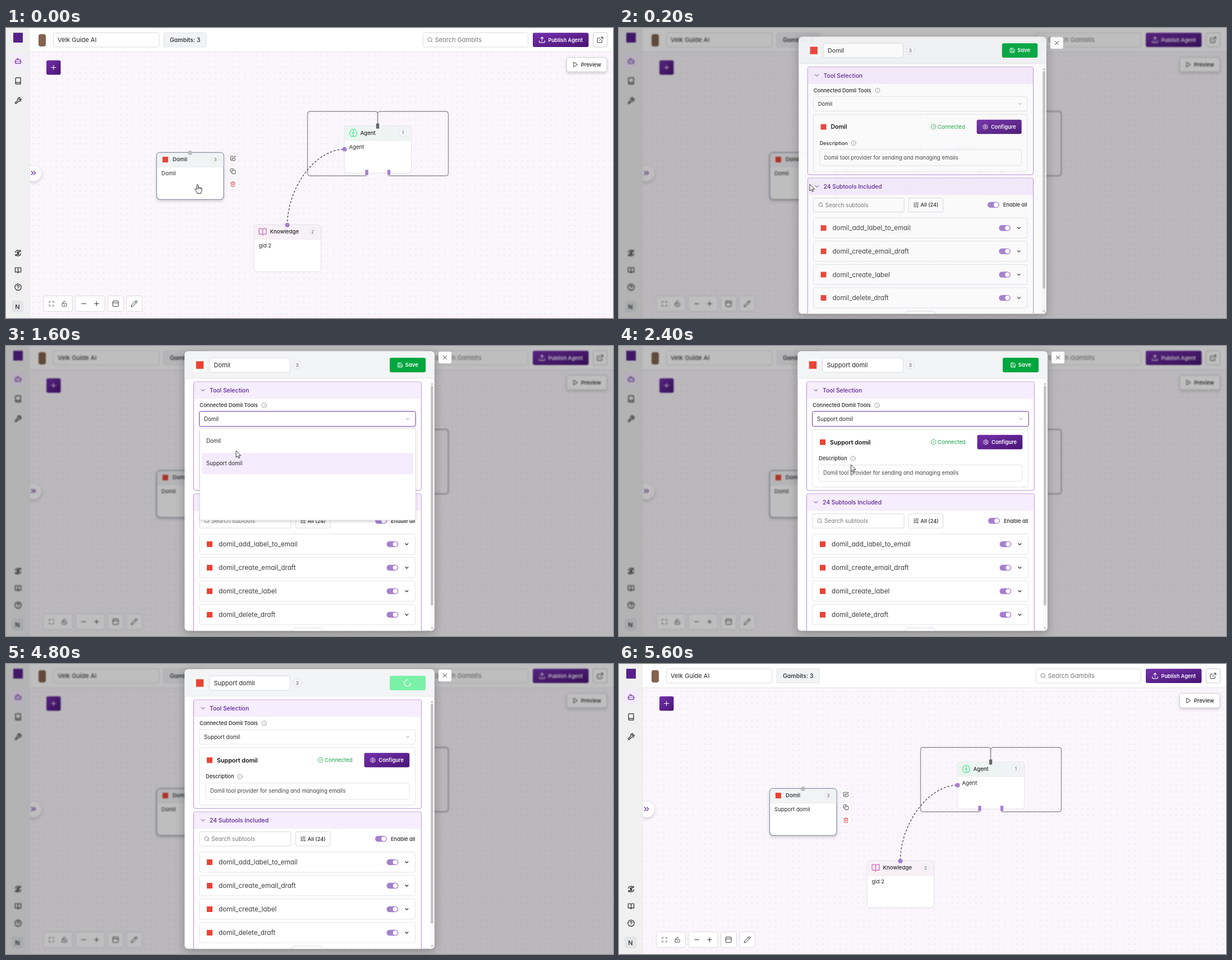
Animation of 1082 by 518 pixels, one loop 5670 ms. Source, as an HTML page:

```html
<!DOCTYPE html>
<html lang="en">
<head>
<meta charset="utf-8">
<title>Agent builder</title>
<style>
html, body { margin: 0; width: 100%; height: 100%; overflow: hidden; background: #fff; }
svg { display: block; width: 1082px; height: 518px; }
text { font-family: Inter, "Open Sans", sans-serif; font-feature-settings: "cv11"; white-space: pre; }
</style>
</head>
<body>
<svg id="stage" viewBox="0 0 1082 518"></svg>
<script>
const LOOP = 5670;
const TOOL = 'Domil', RENAMED = 'Support domil';
const INK = '#262626', PURPLE = '#5c2394', LILAC = '#a67fcf', LINE = '#e2e3e6', RED = '#ea4335';

// ---- drawing helpers (all return SVG markup) ----
const box = (x, y, x2, y2, fill, stroke = 'none', r = 3, extra = '') =>
  `<rect x="${x}" y="${y}" width="${x2 - x}" height="${y2 - y}" rx="${r}" fill="${fill}" stroke="${stroke}" ${extra}/>`;
const disc = (x, y, r, fill, stroke = 'none', extra = '') =>
  `<circle cx="${x}" cy="${y}" r="${r}" fill="${fill}" stroke="${stroke}" ${extra}/>`;
const label = (s, x, cy, size, fill = INK, weight = 400, extra = '') =>
  `<text x="${x}" y="${cy + size * 0.36}" font-size="${size}" fill="${fill}" font-weight="${weight}" ${extra}>${s}</text>`;
const line = (d, stroke, w = 1, extra = '') =>
  `<path d="${d}" fill="none" stroke="${stroke}" stroke-width="${w}" ${extra}/>`;
const mark = (cx, cy, s) => box(cx - s / 2, cy - s / 2, cx + s / 2, cy + s / 2, RED, 'none', 0);
const badge = (n, cx, cy, r = 6.5) =>
  disc(cx, cy, r, '#f6f6f8', '#e3e4e8') + label(n, cx, cy, 8.2, '#555', 400, 'text-anchor="middle"');

// icons on a 24 unit grid
const ICONS = {
  bot: 'M12 8V4H8M6 8H18Q20 8 20 10V18Q20 20 18 20H6Q4 20 4 18V10Q4 8 6 8ZM2 14H4M20 14H22M15 13V15M9 13V15',
  book: 'M4 19.5V4.5A2.5 2.5 0 0 1 6.5 2H20V22H6.5A2.5 2.5 0 0 1 6.5 17H20',
  wrench: 'M14.7 6.3a1 1 0 0 0 0 1.4l1.6 1.6a1 1 0 0 0 1.4 0l3.8-3.8a6 6 0 0 1-7.9 7.9l-7 7a2 2 0 0 1-3-3l7-7a6 6 0 0 1 7.9-7.9z',
  coin: 'M3 10A9.5 9.5 0 0 1 20 7M21 14A9.5 9.5 0 0 1 4 17M20 3V7H16M4 21V17H8M15 9Q12 7 9.5 9T12 12T14.5 15T9 15M12 6V18',
  open: 'M12 7V21M3 18V4H8Q12 4 12 7Q12 4 16 4H21V18H15Q12 18 12 21Q12 18 9 18Z',
  help: 'M22 12A10 10 0 1 1 2 12A10 10 0 1 1 22 12M9 9A3 3 0 0 1 15 10Q15 12 12 13.5M12 17V17.1',
  info: 'M22 12A10 10 0 1 1 2 12A10 10 0 1 1 22 12M12 16V12M12 8V8.1',
  done: 'M21.8 10A10 10 0 1 1 17 3.3M9 11L12 14L22 4',
  search: 'M19 11A8 8 0 1 1 3 11A8 8 0 1 1 19 11M21 21L16.7 16.7',
  upload: 'M12 15V3M7 8L12 3L17 8M3 15V19Q3 21 5 21H19Q21 21 21 19V15',
  link: 'M15 3H21V9M10 14L21 3M18 13V19Q18 21 16 21H5Q3 21 3 19V8Q3 6 5 6H11',
  play: 'M6 3L20 12L6 21Z',
  plus: 'M5 12H19M12 5V19',
  minus: 'M5 12H19',
  x: 'M18 6L6 18M6 6L18 18',
  down: 'M6 9L12 15L18 9',
  double: 'M6 17L11 12L6 7M13 17L18 12L13 7',
  pencil: 'M17 3A2.8 2.8 0 0 1 21 7L7.5 20.5L2 22L3.5 16.5ZM15 5L19 9',
  edit: 'M12 3H5Q3 3 3 5V19Q3 21 5 21H19Q21 21 21 19V12M18.4 2.6A2.1 2.1 0 0 1 21.4 5.6L12 15L8 16L9 12Z',
  copy: 'M10 8H20Q22 8 22 10V20Q22 22 20 22H10Q8 22 8 20V10Q8 8 10 8ZM4 16Q2 16 2 14V4Q2 2 4 2H14Q16 2 16 4',
  trash: 'M3 6H21M19 6V20Q19 22 17 22H7Q5 22 5 20V6M8 6V4Q8 2 10 2H14Q16 2 16 4V6M10 11V17M14 11V17',
  expand: 'M8 3H5Q3 3 3 5V8M21 8V5Q21 3 19 3H16M3 16V19Q3 21 5 21H8M16 21H19Q21 21 21 19V16',
  unlock: 'M5 11H19Q21 11 21 13V20Q21 22 19 22H5Q3 22 3 20V13Q3 11 5 11ZM7 11V7A5 5 0 0 1 16.9 6M12 15V18',
  panel: 'M5 3H19Q21 3 21 5V19Q21 21 19 21H5Q3 21 3 19V5Q3 3 5 3ZM3 9H21',
  brain: 'M12 5A3 3 0 0 0 6 5Q3 6.5 4 10.5Q0 14 4 17.5Q5 22 9 22Q12 21 12 18ZM12 5A3 3 0 0 1 18 5Q21 6.5 20 10.5Q24 14 20 17.5Q19 22 15 22Q12 21 12 18M9 13Q11.5 12 12 9M15 13Q12.5 12 12 9',
  disk: 'M15 3H5Q3 3 3 5V19Q3 21 5 21H19Q21 21 21 19V9ZM17 21V14H7V21M7 3V8H15',
  sliders: 'M3 5H10M14 5H21M14 3V7M3 12H8M12 12H21M8 10V14M3 19H12M16 19H21M16 17V21',
  gear: 'M10 3L14 3L14.6 5.4L17 6.8L19.4 6.1L21.4 9.6L19.6 11.3V13L21.4 14.6L19.4 18L17 17.3L14.6 18.7L14 21H10L9.4 18.7L7 17.3L4.6 18L2.6 14.6L4.4 13V11.3L2.6 9.6L4.6 6.1L7 6.8L9.4 5.4ZM15 12A3 3 0 1 1 9 12A3 3 0 1 1 15 12',
  spin: 'M21 12A9 9 0 1 1 14.8 3.4'
};
const icon = (name, cx, cy, size, color = INK, w = 2) =>
  `<path transform="translate(${cx - size / 2} ${cy - size / 2}) scale(${size / 24})" d="${ICONS[name]}" fill="none" stroke="${color}" stroke-width="${w}" stroke-linecap="round" stroke-linejoin="round"/>`;

const defs = `<defs>
  <linearGradient id="violet" x1="0" y1="0" x2="1" y2="1"><stop stop-color="#7430ac"/><stop offset="1" stop-color="#481573"/></linearGradient>
  <linearGradient id="mint"><stop stop-color="#eaf6f0"/><stop offset="1" stop-color="#f2f3f5"/></linearGradient>
  <pattern id="dots" x="47" y="48" width="10.5" height="10.5" patternUnits="userSpaceOnUse"><circle cx="1" cy="1" r=".7" fill="#d3cbdc"/></pattern>
  <filter id="soft" x="-30%" y="-30%" width="160%" height="170%"><feDropShadow dx="0" dy="2.5" stdDeviation="2.5" flood-opacity=".16"/></filter>
  <filter id="deep" x="-15%" y="-15%" width="130%" height="130%"><feDropShadow dx="0" dy="4" stdDeviation="9" flood-opacity=".28"/></filter>
  <clipPath id="panel"><rect x="318.5" y="9.5" width="445" height="499" rx="6"/></clipPath>
</defs>`;

// ---- workspace ----
function card(x, y, name, n, body, head, border, art, id = '', extra = '') {
  return box(x, y, x + 119.5, y + 84, '#fff', border, 6, extra) +
    `<path d="M${x + .6} ${y + 26}V${y + 6}q0-5.4 5.4-5.4h107.5q5.4 0 5.4 5.4v20z" fill="${head}"/>` +
    line(`M${x + .6} ${y + 26}h118`, '#e6e7ea', .8) + art +
    label(name, x + 28.5, y + 12.5, 9.6, INK, 500) + badge(n, x + 104.5, y + 12.5) +
    label(body, x + 8.5, y + 37.3, 9.6, INK, 400, id);
}

function workspace() {
  const gray = '#919194';
  let s = box(-20, -20, 1102, 538, '#faf6fc', 'none', 0) + box(42, 42, 1102, 538, 'url(#dots)', 'none', 0);
  s += line('M662.5 172V154q0-5-5-5H542.5q-5 0-5 5V259q0 5 5 5H642.5V258', gray, 1.4);
  s += line('M662.5 172V154q0-5 5-5H783.5q5 0 5 5V259q0 5-5 5H682.5V258', gray, 1.4);
  s += card(603, 175, 'Agent', 1, 'Agent', 'url(#mint)', '#dfe2e6', icon('brain', 619, 187.5, 16, '#5be39c', 1.8));
  s += card(442, 351.3, 'Knowledge', 2, 'gid 2', '#f8f1f7', '#dfe0e6', icon('open', 457.5, 364, 17, '#d678bd', 2.1));
  s += card(268.5, 222.3, TOOL, 3, TOOL, '#f2f3f5', '#8b93a3', mark(284, 235, 10), 'id="note"', 'stroke-width="1.3" filter="url(#soft)"');
  s += line('M501.5 352C501.5 284 552.5 216.5 603.5 216.5', '#48434f', 1.3, 'id="wire" stroke-dasharray="3.7 2.9"');
  s += box(659.5, 170, 665.5, 180, '#666', '#fff', 0, 'stroke-width=".6"');
  for (const x of [640, 679.5]) s += box(x, 253, x + 6, 263, LILAC, '#fff', 0, 'stroke-width=".6"');
  s += disc(603.5, 216.5, 4, LILAC) + disc(501.5, 352, 4, LILAC) + disc(328, 223, 4, '#bcbcbe');
  [['edit', INK], ['copy', INK], ['trash', '#e23b3b']].forEach(([name, c], i) => {
    const y = 233 + i * 23;
    s += disc(404.5, y, 10, '#fff', '#eceaf0') + icon(name, 404.5, y, 10.5, c);
  });

  // floating controls
  s += box(72, 57.8, 97.5, 83.5, 'url(#violet)') + icon('plus', 84.8, 70.5, 14, '#fff', 1.8);
  s += box(999.5, 52.5, 1071, 78, '#fff', '#cfcfd6', 3, 'filter="url(#soft)"') +
    icon('play', 1015, 65.3, 11) + label('Preview', 1025, 65.3, 9.4, INK, 500);
  for (const [a, b] of [[66.5, 118.5], [124, 176], [181.5, 209.5], [214.5, 242.5]])
    s += box(a, 478.5, b, 506.5, '#fff', '#dadadf');
  [['expand', 81], ['unlock', 104], ['minus', 138.5], ['plus', 161.5], ['panel', 195.3], ['pencil', 228.5]].forEach(([name, x], i) => {
    s += icon(name, x, 492.5, i < 2 ? 11 : 13, INK, 1.7);
  });
  s += disc(49, 259.5, 14.5, '#fff', '#e9e6ee', 'filter="url(#soft)"') + icon('double', 49, 259, 14.5, PURPLE);

  // top bar
  s += box(42, -20, 1102, 42, '#fff', 'none', 0) + line('M42 42.5H1102', '#e3e1e6');
  s += box(58, 11, 71, 33, '#84634f', 'none', 4);
  s += box(84.5, 8.5, 273, 34, '#fff', '#d9dade') + label('Velk Guide AI', 92, 21.3, 11);
  s += box(281, 8.5, 357, 34, '#f2f3f5', '#e2e3e7') + label('Gambits: 3', 292, 21.3, 10.5, INK, 500);
  s += box(743.5, 8.5, 930.5, 34, '#fff', '#d9dade') + icon('search', 756, 21, 11, '#777') + label('Search Gambits', 764.5, 21.3, 11, '#757575');
  s += box(939, 8.5, 1038.5, 34, 'url(#violet)') + icon('upload', 955.5, 21, 13, '#fff') + label('Publish Agent', 966.5, 21.2, 9.2, '#fff', 600);
  s += box(1046.5, 8.5, 1071.5, 34, '#fff', '#c9c9cf') + icon('link', 1059, 21.2, 13, INK, 1.8);

  // side bar
  s += box(-20, -20, 42.5, 538, '#f0f0f1', 'none', 0) + line('M42.5 43V538', '#e6e4e9', .7);
  s += box(13, 8.5, 30, 26, '#562089', 'none', 0) + box(10, 46, 33, 72, '#f4ebfc');
  [['bot', 59], ['book', 94.5], ['wrench', 130], ['coin', 402], ['open', 432.5], ['help', 463]].forEach(([name, y], i) => {
    s += icon(name, 21.5, y, 13.5, i ? INK : PURPLE, 2.1);
  });
  s += box(10, 487, 31, 508, '#e2e4e6', 'none', 4) + label('N', 20.5, 497.6, 11, INK, 500, 'text-anchor="middle"');
  return s;
}

// ---- dialog ----
const toggle = (x, y) => box(x, y - 5.2, x + 20.8, y + 5.2, LILAC, 'none', 5.2) + disc(x + 15.2, y, 4.1, '#fff');
const section = (y, y2, title) =>
  box(334.5, y, 740.3, y2, '#fff', '#b489d8') +
  box(335, y + .5, 739.8, y + 30.5, '#f6edfd', 'none', 2.5) +
  icon('down', 351, y + 15, 12, PURPLE) + label(title, 363, y + 15.2, 10.4, PURPLE, 500);

function dialog() {
  let s = box(318.5, 9.5, 763.5, 508.5, '#fff', 'none', 6, 'filter="url(#deep)"') +
    '<g clip-path="url(#panel)">' + box(318, 9, 764, 57.5, '#f3f4f6', 'none', 0) + line('M318 57.5H764', '#e6e7ea');
  s += box(334.5, 23, 357, 45.5, '#fafafb') + mark(345.5, 34, 13.5);
  s += box(362.5, 21.3, 506.3, 47, '#fff', '#d9dbe0') + label(TOOL, 370.5, 34.2, 11, INK, 400, 'class="name"');
  s += badge(3, 519, 33.8, 7.5);
  s += box(684, 21, 748, 47, '#00a63e', 'none', 3, 'id="save"');
  s += `<g id="saveText">${icon('disk', 702.5, 34, 10.5, '#fff')}${label('Save', 711.5, 34, 9.6, '#fff', 600)}</g>`;
  s += `<g id="spinner">${icon('spin', 715.5, 34, 15, '#fff', 2)}</g>`;

  s += section(64, 258, 'Tool Selection');
  s += label(`Connected ${TOOL} Tools`, 345, 105.8, 9.4, INK, 500) + icon('info', 460.2, 106, 10, '#777', 1.8);
  s += box(345, 117.2, 729.5, 143.3, '#fff', LINE, 3) + box(344.5, 116.7, 730.2, 143.7, 'none', '#7440ab', 3, 'id="focus"') +
    label(TOOL, 353, 130.2, 9.7, INK, 400, 'class="name"') + icon('down', 716, 130.3, 10, '#777');
  s += box(345, 149.2, 729.5, 252, '#fff', LINE) + mark(363, 171.8, 10);
  s += label(TOOL, 376, 171.8, 10.7, '#111', 600, 'class="name"');
  s += icon('done', 560.8, 171.5, 10.5, '#16a34a') + label('Connected', 568, 171.3, 9.6, '#16a34a');
  s += box(638.5, 158.8, 719.2, 184.6, 'url(#violet)') + icon('gear', 653.8, 171.8, 11, '#fff') + label('Configure', 664, 171.3, 9.4, '#fff', 600);
  s += label('Description', 356, 200.7, 9.2, INK, 500) + icon('info', 417, 201, 10, '#777', 1.8);
  s += box(356, 212.5, 719, 241.5, '#fff', LINE) + label(`${TOOL} tool provider for sending and managing emails`, 364, 227, 9.65, '#444');

  s += section(264, 540, '24 Subtools Included');
  s += box(345, 299.7, 508, 325.2, '#fff', '#d9dade') + icon('search', 358, 312.3, 10.5, '#777') + label('Search subtools', 366, 312.6, 10.2, '#757575');
  s += box(516.3, 299.7, 578, 325.2, '#fff', '#d9dade') + icon('sliders', 529.5, 312.4, 11) + label('All (24)', 537.5, 312.2, 9.3, INK, 500);
  s += toggle(658, 312.3) + label('Enable all', 686, 312.2, 9.3, INK, 500);
  ['add_label_to_email', 'create_email_draft', 'create_label', 'delete_draft'].forEach((name, i) => {
    const y = 354 + i * 42;
    s += box(345, y - 18.3, 729.5, y + 18, '#fff', LINE) + mark(363, y, 10) +
      label(TOOL.toLowerCase() + '_' + name, 379, y, 11.7, '#3c3c3c') + toggle(678.5, y) + icon('down', 714.3, y, 10, INK, 2.6);
  });
  s += box(511.5, 503.8, 563.5, 530, '#fff', '#d9dade');

  s += box(755.5, 58, 764, 509, '#fafafa', 'none', 0) + box(757.2, 71, 761.6, 463.5, '#c3c3c5', 'none', 2);
  s += '<path d="M757.2 69l2.2-3 2.2 3zM757.2 502.5l2.2 3 2.2-3z" fill="#b5b5b5"/>';
  s += '<g id="menu">' + box(345.3, 147, 730, 311, '#fff', '#dddde2', 3, 'filter="url(#soft)"') +
    box(349, 191, 726, 229, '#f4ebfc', 'none', 2.5) +
    label(TOOL, 357, 170, 9.7) + label(RENAMED, 357, 210, 9.7) + '</g></g>';
  s += box(771, 10, 794, 31, '#fff') + icon('x', 782.5, 20.5, 12, '#222', 1.9);
  return s;
}

const pointers = `<g id="cursor">
  <path id="arrow" d="M0 0V12L2.9 9.4L4.7 13.5L6.6 12.6L4.8 8.7H8.6Z" fill="#fff" stroke="#222" stroke-width=".9" stroke-linejoin="round"/>
  <path id="hand" d="M0 1.2Q1.3-.6 2.5 1.2V6Q3.7 4.8 4.7 6.2Q6 5.2 6.9 6.6Q8.7 6 9 8V11.5Q8.8 13.5 7.6 14.6V16.4H.8V15Q-1.2 12.6-3.1 10Q-3.6 8.4-2 8.2Q-.9 8.4 0 9.6ZM2.5 6V8.8M4.7 6.4V8.8M6.9 6.8V9" fill="#fff" stroke="#222" stroke-width=".95" stroke-linejoin="round"/></g>`;

const $ = id => document.getElementById(id);
$('stage').innerHTML = defs + `<g id="work">${workspace()}</g>` +
  '<rect id="shade" width="1082" height="518"/>' + `<g id="dialog">${dialog()}</g>` + pointers;

// ---- motion ----
const clamp = v => Math.max(0, Math.min(1, v));
const smooth = v => v * v * (3 - 2 * v);
const show = (id, on) => $(id).setAttribute('visibility', on ? 'inherit' : 'hidden');

const path = [ // time, x, y of the pointer tip
  [0, 340, 279], [200, 340, 279], [600, 358, 198], [930, 398.5, 137], [1200, 407, 130], [1330, 407, 130],
  [1800, 412, 223], [1930, 412, 223], [2130, 413.5, 212], [2600, 413.5, 212], [3130, 712.5, 28],
  [3800, 712.5, 28], [4330, 214, 392], [4600, 10, 545]
];
function pointerAt(t) {
  let i = 0;
  while (i < path.length - 2 && t > path[i + 1][0]) i++;
  const [t0, x0, y0] = path[i], [t1, x1, y1] = path[i + 1];
  const k = smooth(clamp((t - t0) / (t1 - t0)));
  return [x0 + (x1 - x0) * k, y0 + (y1 - y0) * k];
}

function render(t) {
  const open = 1 - (1 - clamp((t - 65) / 235)) ** 2;
  const k = open * (1 - smooth(clamp((t - 5060) / 200)));
  const shown = k > 0;
  const cover = clamp(k * 1.22); // backdrop settles before the panel does
  show('dialog', shown);
  $('shade').setAttribute('fill-opacity', 0.255 * cover);
  $('work').style.filter = shown ? `blur(${cover}px)` : 'none';
  $('dialog').setAttribute('opacity', clamp(k * 1.14));
  $('dialog').setAttribute('transform', `translate(541 ${259 + 23 * (1 - k)}) scale(${0.95 + 0.05 * k}) translate(-541 -259)`);

  const name = t < 2400 ? TOOL : RENAMED;
  document.querySelectorAll('.name').forEach(n => { n.textContent = name; });
  $('note').textContent = t < 5000 ? TOOL : RENAMED;
  show('menu', t >= 1270 && t < 2400);
  show('focus', t >= 1270 && t < 3200);

  const busy = t >= 3530, over = t >= 3060;
  $('save').setAttribute('fill', busy ? '#7bf1a8' : over ? '#008236' : '#00a63e');
  show('saveText', !busy);
  show('spinner', busy);
  $('spinner').setAttribute('transform', `rotate(${(t - 4800) * 0.36} 715.5 34)`);
  $('wire').setAttribute('stroke-dashoffset', 6.6 * (1 - t % 500 / 500));

  const [x, y] = pointerAt(t);
  const hand = t < 130 || (t >= 800 && t < 1400) || (t >= 3060 && t < 3860);
  show('cursor', t < 4600);
  show('hand', hand);
  show('arrow', !hand);
  $('cursor').setAttribute('transform', `translate(${x} ${y})`);
}

function frame() {
  render(performance.now() % LOOP);
  requestAnimationFrame(frame);
}
frame();
</script>
</body>
</html>
```
